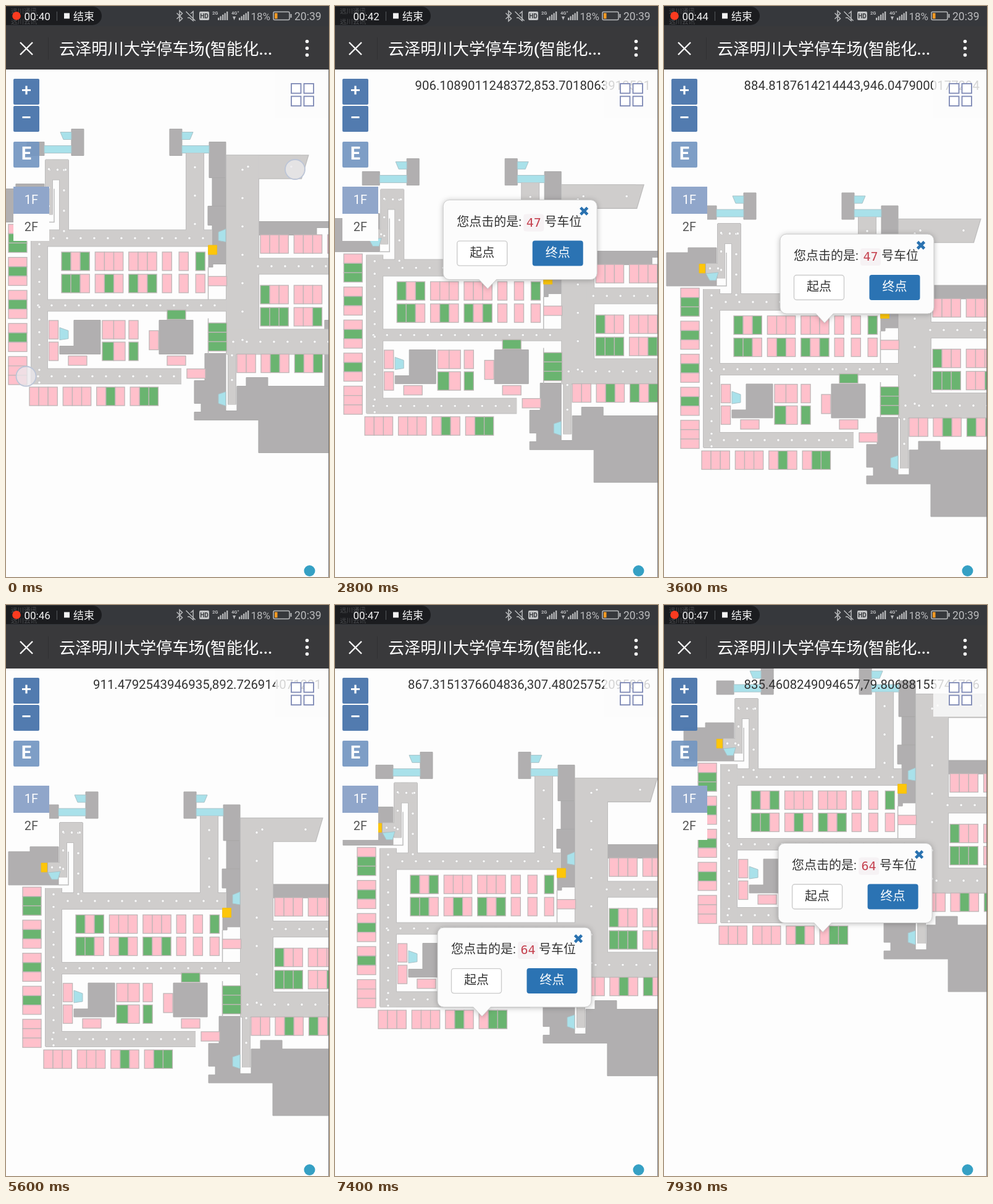
These frames come from a looping animation (523x926 px, 8000 ms). An HTML page:

```html
<!DOCTYPE html>
<html lang="zh-CN">
<head>
<meta charset="utf-8">
<title>Parking map</title>
<style>
html, body { margin: 0; width: 100%; height: 100%; overflow: hidden; background: #fdfdfd; }
svg { display: block; width: 523px; height: 926px; font-family: Roboto, "Noto Sans CJK SC", "Noto Sans CJK", "Noto Sans", sans-serif; }
.mid { text-anchor: middle; }
.building { fill: #b1afb0; stroke: #aaa9a9; }
.road { fill: #cfcdcc; stroke: #bebdbd; stroke-width: 2.6; paint-order: stroke; }
.water { fill: #a9e1ea; stroke: #a9c3c8; }
.yellow { fill: #fdc60a; stroke: #efbd1c; }
.p, .g { stroke: #bfb6b7; stroke-width: 1.3; }
.p { fill: #ffc0cb; }
.g { fill: #6ab470; }
.line { fill: none; stroke: #bdbdbd; stroke-width: 1.5; }
.touch circle { fill: #ebe9ec; fill-opacity: .75; stroke: #bcc5d7; stroke-width: 1.8; }
#pop { filter: drop-shadow(0 1px 4px rgba(0, 0, 0, .25)); }
</style>
</head>
<body>
<svg viewBox="0 0 523 926">
  <rect width="523" height="926" fill="#fdfdfd"/>
  <g id="map"></g>

  <!-- map controls -->
  <text id="coords" x="511" y="135.5" text-anchor="end" font-size="20.4" fill="#333"></text>
  <rect x="436" y="103" width="87" height="78" fill="#fdfdfd" opacity=".8"/>
  <g id="tiles" fill="#fff" stroke="#7d88b4" stroke-width="1.8"></g>
  <circle cx="491.5" cy="916" r="9" fill="#35a0c4"/>
  <g id="pop">
    <path d="M-62-144H167a10 10 0 0 1 10 10V-25a10 10 0 0 1-10 10H14L0 0-14-15H-62a10 10 0 0 1-10-10V-134a10 10 0 0 1 10-10z" fill="#fcfcfc" stroke="#ccc"/>
    <path d="M150.500-131.500l11 11m0-11l-11 11" stroke="#2a72b0" stroke-width="4.6"/>
    <g font-size="20" fill="#333">
      <text x="-50" y="-102">您点击的是:</text>
      <rect x="58" y="-121" width="33" height="28" rx="4" fill="#f6f2f4"/>
      <text id="spot" class="mid" x="74.5" y="-101" fill="#c5414f" font-family="'DejaVu Sans Mono', 'Noto Sans Mono', monospace"></text>
      <text x="92" y="-102">号车位</text>
      <rect x="-49.5" y="-77.5" width="81" height="40" rx="4" fill="#fff" stroke="#ccc" stroke-width="1.4"/>
      <text class="mid" x="-9" y="-52">起点</text>
      <rect x="72.5" y="-78" width="82" height="41" rx="4" fill="#2b73b3"/>
      <text class="mid" x="113.500" y="-52" fill="#fff">终点</text>
    </g>
  </g>
  <g class="mid" fill="#fff" font-weight="700">
    <g fill="#4f79ae" opacity=".98">
      <rect x="12" y="118" width="42" height="42" rx="2"/>
      <rect x="12" y="162" width="42" height="42" rx="2"/>
    </g>
    <rect x="12" y="220" width="42" height="42" rx="2" fill="#7396c2" opacity=".92"/>
    <path d="M26 136.500h14m-7-7v14M26.500 180.500h13" stroke="#fff" stroke-width="3.2"/>
    <text x="33" y="249" font-size="29">E</text>
  </g>
  <g class="mid" font-size="20">
    <rect x="12" y="293" width="58" height="44" fill="#90a6ca"/>
    <text x="41" y="321" fill="#fff">1F</text>
    <rect x="12" y="337" width="58" height="44" fill="#fdfdfd"/>
    <text x="41" y="364.500" fill="#555">2F</text>
  </g>
  <g class="touch" id="pinch"><circle cx="468" cy="265" r="16"/><circle cx="32.500" cy="600.500" r="16"/></g>
  <g class="touch" id="tap"><circle r="16"/></g>

  <!-- title and status bars -->
  <rect width="523" height="103" fill="#39393b"/>
  <rect width="523" height="33" fill="#36383c"/>
  <path d="M23 59l20 20m0-20l-20 20" stroke="#fff" stroke-width="2.4"/>
  <path d="M68.500 51v36" stroke="#303032"/>
  <text x="86" y="79" font-size="26.200" font-weight="500" fill="#fff">云泽明川大学停车场(智能化...</text>
  <path d="M487.500 57.500v23" stroke="#fff" stroke-width="5.600" stroke-linecap="round" stroke-dasharray="0 11"/>

  <path d="M0 1H140a15 15 0 0 1 0 30H0z" fill="#1b1c1f"/>
  <g font-size="10.500" fill="#4b4d50"><text x="8" y="12">远川通讯</text><text x="8" y="29">远川云讯</text></g>
  <circle id="rec" cx="17" cy="16" r="6.800" fill="#fb3b20"/>
  <g font-size="17" fill="#f4f4f4">
    <text id="clock" x="29.500" y="22.500"></text>
    <path d="M82.500 9v15" stroke="#55575a"/>
    <rect x="94" y="11.500" width="9" height="9"/>
    <text x="109" y="22.500">结束</text>
  </g>
  <g fill="none" stroke="#b9babc" stroke-width="1.500">
    <path d="M276.500 11.500l9 9-4.500 4V8l4.500 4-9 9"/>
    <path d="M291.500 9l15 15M294 19h3l6 5V9l-4 3.500"/>
    <rect x="433" y="9.500" width="26" height="13" rx="2"/>
    <path d="M461.500 13v6" stroke-width="2"/>
  </g>
  <rect x="313" y="9" width="16" height="14" rx="2" fill="#c4c5c6"/>
  <text x="321" y="20" class="mid" font-size="10" font-weight="700" fill="#36383c">HD</text>
  <rect x="435" y="11.500" width="4.500" height="9" fill="#f59a23"/>
  <g fill="#b9babc">
    <text x="334" y="14" font-size="7.500" font-weight="700">2G</text>
    <text x="365" y="14" font-size="7.500" font-weight="700">4G⁺</text>
    <path d="M367 17l2.500 6 2.500-6z"/>
    <g id="signal"></g>
    <text x="396.500" y="22.500" font-size="17">18%</text>
    <text x="467" y="22.500" font-size="17.500">20:39</text>
  </g>
  <path d="M522.500 103V926" stroke="#77787a"/>
</svg>

<script>
const $ = id => document.getElementById(id);
const LOOP = 8000, FPS = 15, UNIT = 5 / 3, PAN = 1100;
const PAN1 = 2276, PAN2 = 7000, CLOSE = 4590;

const rect = (c, x, y, w, h) => `<rect class="${c}" x="${x}" y="${y}" width="${w}" height="${h}"/>`;
const path = (c, d) => `<path class="${c}" d="${d}"/>`;

// A lane is a centre line with a width and evenly spaced dots.
const lane = (d, width, step = 22) => ({ d, width, step });
const stroke = (d, color, width, more = '') =>
  `<path d="${d}" fill="none" stroke="${color}" stroke-width="${width}" ${more}/>`;

function roads() {
  const lanes = [
    lane('M89 480H357', 26), lane('M64 589H381', 18), lane('M64 704H307', 24),
    lane('M77 459V716', 26, 20.4), lane('M117 353V480', 14, 33),
    lane('M87 369H124', 32, 13), lane('M92.500 353V442', 11, 30), lane('M68 425.500H98', 15, 13),
    lane('M329 342V480', 28, 46), lane('M380 364H500', 36, 70), lane('M406 346V668', 52, 46),
    lane('M420 525.500H609', 25), lane('M380 648H609', 40), lane('M389 650V750', 12, 40),
  ];
  const dots = l => `stroke-linecap="round" stroke-dasharray="0 ${l.step}" stroke-dashoffset="${-l.step / 2}"`;
  return lanes.map(l => stroke(l.d, '#bebdbd', l.width + 2)).join('')
    + path('road', 'M380 346H512L501 383H380z')
    + lanes.map(l => stroke(l.d, '#cfcdcc', l.width)).join('')
    + lanes.map(l => stroke(l.d, '#bebdbd', 4.8, dots(l)) + stroke(l.d, '#f7f7f7', 3.8, dots(l))).join('');
}

function buildings() {
  const gate = path('building', 'M129 303h20v43h-20z')
    + path('water', 'M85 330h44v12H85zM111 308h18v12h-13z');
  return path('building', 'M57 324h28v22H57zM352 324h27v58h-27zM357 382h22v46h-22z')
    + gate + `<g transform="matrix(-1 0 0 1 437 0)">${gate}</g>`
    + path('building', 'M350 428h29v94h-21v5h-7v-37h6v-31h-7z')
    + path('building', 'M432 453h177v10h-83v12h-94z')
    + path('building', 'M4 400h35v-8h46v62H4z')
    + path('building', 'M133 613h43v55h-66v-13h23zM271 613h55v55h-55zM539 613h70v107h-70z')
    + path('building', 'M345 667h34v93h18v-40h15v-14h35v14h162v108H432v-53H328v-13h11v-14h-11v-37h17z');
}

function details() {
  return path('water', 'M367 470l12-5v21l-12-2zM68 434l20-2-4 13H74zM110 625l14 5v13l-14 2zM367 733l12-4v23l-12-4z')
    + path('yellow', 'M350.500 491.500h14v15h-14zM57 418.500h9.500v14.500H57z')
    + path('line', 'M101 400V454H85M350.500 527V580M350.500 610V668');
}

// Groups in a row: "p" is taken, "g" is free; a lone stall needs half the pitch.
function row(x, y, text, w = 15.1) {
  let out = '';
  for (const group of text.split(' ')) {
    [...group].forEach((k, i) => out += rect(k, x + i * w, y, w, 30));
    x += group.length > 1 ? 54.4 : 27;
  }
  return out;
}
const stack = (x, y, kinds) => [...kinds].map((k, i) => rect(k, x, y + i * 15.2, 30, 15.2)).join('');

function stalls() {
  const left = ['pgg', 'pgp', 'pgp', 'pgp', 'ppp'].map((kinds, i) => stack(27, 457.5 + i * 53.6, kinds));
  const yard = ['pp', 'gp'].map((kinds, i) => {
    const y = 613.5 + i * 35;
    return row(92.5, y, 'p') + row(179, y, kinds, 18.5) + row(222, y, kinds[0]);
  });
  return left.join('') + yard.join('')
    + row(113, 502.5, 'gpg ppp ppp p p g') + row(113, 538.5, 'ggp pgp gpg p p p')
    + row(61, 721.5, 'ppp ppp pgp pgg')
    + row(435, 474.5, 'ppp ppp ppp') + row(435, 556.5, 'gpp ppp') + row(435, 592.5, 'ggg ppg')
    + row(397, 668, 'pp') + row(436, 668, 'pgp gpg')
    + stack(350.5, 617.5, 'ggg') + stack(350.5, 542, 'p') + stack(316, 692, 'p')
    + stack(124, 671, 'p') + stack(284, 671, 'p') + stack(284, 596.5, 'g')
    + rect('p', 255, 630, 15, 31);
}

$('map').innerHTML = buildings() + roads() + details() + stalls();
$('tiles').innerHTML = [0, 1, 2, 3]
  .map(i => rect('', 462 + i % 2 * 20.5, 126 + (i >> 1) * 20.5, 15.5, 15.5)).join('');
$('signal').innerHTML = [343, 377].map(x => [0, 1, 2, 3, 4]
  .map(i => rect('', x + i * 3.5, 19 - i * 2.5, 2.3, 4 + i * 2.5)).join('')).join('');

const TICKS = [1000, 1930, 2930, 3600, 4530, 5600, 6900];
const TAPS = [
  { from: 1930, to: PAN1, x: 228, y: 421 },
  { from: 4130, to: 4530, x: 246, y: 453 },
  { from: 6600, to: PAN2, x: 227, y: 740 },
];

const clamp = u => Math.min(1, Math.max(0, u));
const ease = t => { const u = clamp(t); return u * u * (3 - 2 * u); };
const show = (el, on) => el.setAttribute('visibility', on ? 'visible' : 'hidden');
const move = (el, x, y) => el.setAttribute('transform', `translate(${x} ${y})`);

// Each pan brings the tapped stall to the middle of the view.
function offset(t) {
  const a = 1 - ease((t - PAN1) / PAN), b = ease((t - PAN2) / PAN);
  const drift = 0.8 * (1 - clamp((t - 1000) / 600));
  return [drift - 23.8577 * a + 29.9777 * b, -103.4829 * a - 214.2606 * b];
}

// Map position under the last tap; it shifts as the map pans.
function coords(t, dx, dy) {
  if (t < PAN1) return '';
  const [x, y] = t < CLOSE ? [884.8187614214443, 946.0479000177294]
    : t < PAN2 ? [911.4792543946935, 892.726914071231]
    : [882.3302641318085, 414.7983642076607];
  return `${x - UNIT * dx},${y + UNIT * dy}`;
}

function draw(ms) {
  const t = Math.floor((ms % LOOP + 5) * FPS / 1000) * 1000 / FPS;
  const [dx, dy] = offset(t);
  move($('map'), dx, dy);
  $('coords').textContent = coords(t, dx, dy);

  const second = t >= PAN2;
  show($('pop'), second || t >= PAN1 && t < CLOSE);
  $('spot').textContent = second ? '64' : '47';
  move($('pop'), dx + (second ? 229 : 260), dy + (second ? 731.5 : 514));

  show($('pinch'), t < 1130);
  const tap = TAPS.find(p => t >= p.from && t < p.to);
  show($('tap'), tap);
  if (tap) move($('tap'), tap.x, tap.y);

  // The record light goes dark half a second after each tick.
  const passed = TICKS.filter(k => t >= k);
  const age = passed.length ? t - passed.at(-1) : 0;
  $('clock').textContent = '00:' + (40 + passed.length);
  show($('rec'), age % 930 < 470);
}

const start = performance.now();
function frame() {
  draw(performance.now() - start);
  requestAnimationFrame(frame);
}
frame();
</script>
</body>
</html>
```
